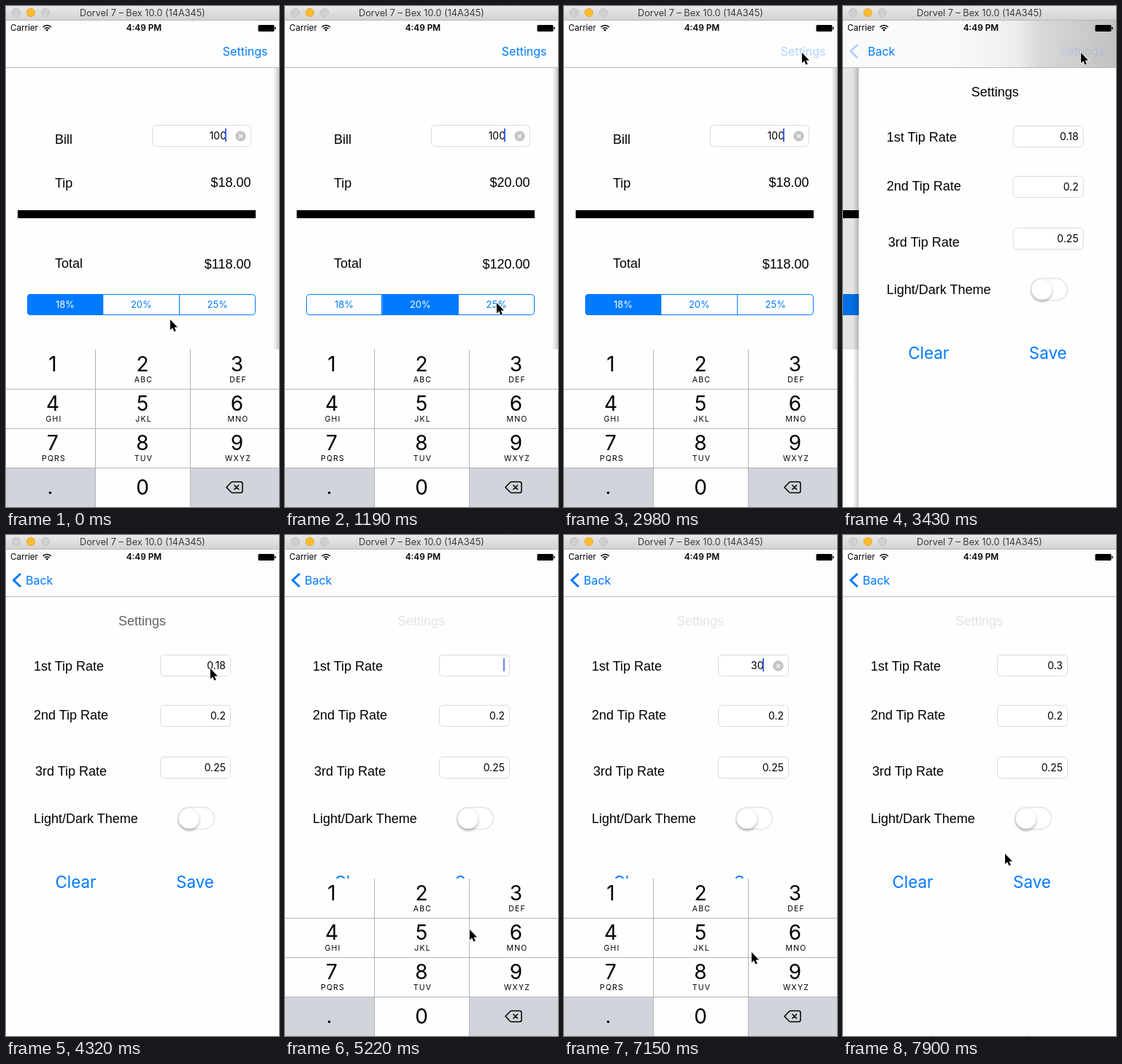
Write an HTML page that moves like this. It is 374 px wide and 687 px high and loops after 8000 ms.

```html
<!DOCTYPE html>
<html lang="en">
<head>
<meta charset="utf-8">
<title>Tip calculator</title>
<style>
html, body { margin: 0; width: 100%; height: 100%; overflow: hidden; background: #fefefe; }
svg { display: block; width: 374px; height: 687px; }
text { font-family: Inter, Roboto, sans-serif; white-space: pre; }
.label { font-family: "Liberation Sans", Arial, sans-serif; font-size: 18px; }
.nav { font-size: 16px; fill: #007aff; }
.value { font-size: 14px; text-anchor: end; }
.big { font-size: 22.4px; fill: #007aff; text-anchor: middle; }
.seg { font-size: 13px; text-anchor: middle; }
.digit { font-size: 28px; text-anchor: middle; }
.abc { font-size: 10.5px; letter-spacing: 1.2px; text-anchor: middle; }
</style>
</head>
<body>
<svg id="stage" viewBox="0 0 374 687">
  <defs>
    <linearGradient id="chrome" x2="0" y2="1">
      <stop stop-color="#e9e9e9"/><stop offset="1" stop-color="#d1d1d1"/>
    </linearGradient>
    <linearGradient id="edge">
      <stop stop-opacity="0"/><stop offset="1" stop-opacity=".22"/>
    </linearGradient>
    <linearGradient id="haze">
      <stop offset=".4" stop-color="#fafafa"/><stop offset=".63" stop-color="#eee"/>
      <stop offset=".72" stop-color="#d8d8d8"/><stop offset="1" stop-color="#c2c2c2"/>
    </linearGradient>
    <filter id="soft" x="-50%" y="-50%" width="200%" height="200%">
      <feDropShadow dx="0" dy="2.5" stdDeviation="1.6" flood-opacity=".28"/>
    </filter>
    <clipPath id="pill"><rect x="29" y="395" width="313" height="29" rx="4.5"/></clipPath>
  </defs>
</svg>
<script>
const LOOP = 8000, TICK = 149.06;
const BLUE = '#007aff';
const stage = document.getElementById('stage');

function add(parent, tag, attrs = {}, content) {
  const node = document.createElementNS('http://www.w3.org/2000/svg', tag);
  set(node, attrs);
  if (content !== undefined) node.textContent = content;
  parent.appendChild(node);
  return node;
}
function set(node, attrs) {
  for (const name in attrs) node.setAttribute(name, attrs[name]);
}
const group = parent => add(parent, 'g');
const rect = (p, x, y, width, height, fill, more) => add(p, 'rect', { x, y, width, height, fill, ...more });
const text = (p, cls, x, y, content, more) => add(p, 'text', { class: cls, x, y, ...more }, content);
const line = (p, d, stroke, width, more) =>
  add(p, 'path', { d, stroke, 'stroke-width': width, fill: 'none', ...more });
const show = (node, on) => set(node, { opacity: +on });
const move = (node, x, y) => set(node, { transform: `translate(${x} ${y})` });

function field(p, x, y, width) {
  rect(p, x + .5, y + .5, width - 1, 29, '#fff', { rx: 5, stroke: '#dadada' });
}
function clearButton(p, x, y) {
  const g = group(p);
  add(g, 'circle', { cx: x, cy: y, r: 7.2, fill: '#c4c4c8' });
  line(g, `M${x - 2.6} ${y - 2.6}l5.2 5.2m0 -5.2l-5.2 5.2`, '#fff', 1.3);
  return g;
}

// Bill page
const bill = group(stage);
rect(bill, 0, 85, 374, 602, '#fefefe');
text(bill, 'label', 67, 188.5, 'Bill');
text(bill, 'label', 67, 248.5, 'Tip');
text(bill, 'label', 67, 358.5, 'Total');
field(bill, 200, 163, 136);
text(bill, 'value', 302, 182.5, '100');
clearButton(bill, 321.5, 178.5);
const billCaret = rect(bill, 300, 168, 2, 18, '#4362ee');
const tip = text(bill, 'label', 335.5, 248, '', { 'text-anchor': 'end' });
const total = text(bill, 'label', 335.5, 359.5, '', { 'text-anchor': 'end' });
rect(bill, 16, 280, 326, 11, '#000');
const segBox = add(bill, 'g', { 'clip-path': 'url(#pill)' });
const segments = ['18%', '20%', '25%'].map((name, i) => ({
  fill: rect(segBox, 29 + i * 104.3, 395, 104.3, 29, BLUE),
  name: text(bill, 'seg', 81 + i * 104.4, 414, name)
}));
line(bill, 'M132.5 396V423M237.5 396V423', BLUE, 1);
rect(bill, 29.5, 395.5, 312, 28, 'none', { rx: 4, stroke: BLUE });
const dim = rect(stage, 0, 85, 374, 386, '#000', { 'fill-opacity': .1 });

// Settings page
const prefs = group(stage);
rect(prefs, -8, 20, 8, 667, 'url(#edge)');
rect(prefs, 0, 20, 374, 667, '#fefefe');
const heading = text(prefs, 'label', 154, 124, 'Settings');
text(prefs, 'label', 38, 186, '1st Tip Rate');
text(prefs, 'label', 38, 253, '2nd Tip Rate');
text(prefs, 'label', 40, 330, '3rd Tip Rate');
text(prefs, 'label', 38, 395, 'Light/Dark Theme');
[164, 233, 304].forEach(y => field(prefs, 211, y, 97));
const rate = text(prefs, 'value', 301, 183.5, '');
text(prefs, 'value', 301, 252.5, '0.2');
text(prefs, 'value', 301, 323.5, '0.25');
const rateClear = clearButton(prefs, 293.5, 179.5);
const rateCaret = rect(prefs, 299, 169, 2, 18, '#4362ee');
rect(prefs, 235.5, 373.5, 50, 30, '#fff', { rx: 15, stroke: '#e2e2e2', 'stroke-width': 1.4 });
add(prefs, 'circle', { cx: 250.7, cy: 388.7, r: 14.2, fill: '#fff', stroke: '#ddd', 'stroke-width': .6, filter: 'url(#soft)' });
text(prefs, 'big', 95.5, 483.5, 'Clear');
text(prefs, 'big', 259, 483.5, 'Save');

// Keypad
const pad = group(stage);
rect(pad, 0, 471, 374, 216, '#fefefe');
rect(pad, 0, 633, 122, 54, '#d1d4db');
rect(pad, 253, 633, 121, 54, '#d1d4db');
const key3 = rect(pad, 253, 471, 121, 54, '#d1d4db');
const key0 = rect(pad, 123, 633, 129, 54, '#d1d4db');
line(pad, 'M122.5 471V687M252.5 471V687M0 525.5H374M0 579.5H374M0 633.5H374', '#b4b4b6', 1);
const colX = [64, 187, 316.5];
['', 'ABC', 'DEF', 'GHI', 'JKL', 'MNO', 'PQRS', 'TUV', 'WXYZ'].forEach((letters, i) => {
  const x = colX[i % 3], y = 501 + 54 * Math.floor(i / 3);
  text(pad, 'digit', x, y, i + 1);
  text(pad, 'abc', x + 1.5, y + 15, letters);
});
text(pad, 'digit', 187, 670, '0');
add(pad, 'circle', { cx: 60.5, cy: 667.5, r: 1.8 });
line(pad, 'M302 660L308.5 653.2Q309.3 652.5 310.3 652.5H321.5Q324 652.5 324 655V665Q324 667.5 321.5 667.5H310.3Q309.3 667.5 308.5 666.8Z' +
  'M312.5 656.7l6.6 6.6m0 -6.6l-6.6 6.6', '#000', 1.5, { 'stroke-linejoin': 'round' });

// Navigation bar
rect(stage, 0, 20, 374, 64, '#fdfdfd');
const haze = rect(stage, 0, 20, 374, 64, 'url(#haze)');
rect(stage, 0, 84, 374, 1, '#b9b9b9');
const link = text(stage, 'nav', 358.5, 68, 'Settings', { 'text-anchor': 'end' });
const chevron = line(stage, 'M20 53L10.5 62L20 71', BLUE, 3);
const back = text(stage, 'nav', 27, 68, 'Back');

// Status bar
text(stage, '', 6, 34, 'Carrier', { 'font-size': 11.6 });
line(stage, 'M50.6 29a7.6 7.6 0 0 1 11.2 0M52.8 31.2a4.8 4.8 0 0 1 6.8 0', '#000', 1.5);
add(stage, 'path', { d: 'M54.3 32.6a2.8 2.8 0 0 1 3.8 0L56.2 34.7Z' });
text(stage, '', 189, 34, '4:49 PM', { 'font-size': 11.8, 'font-weight': 600, 'text-anchor': 'middle' });
rect(stage, 345.5, 26, 22, 9, '#000', { rx: 1.5 });
rect(stage, 368.2, 28.7, 1.5, 3.6, '#000', { rx: .7 });

// Window bar
rect(stage, 0, 0, 374, 20, 'url(#chrome)');
rect(stage, 0, 19, 374, 1, '#b8b8b8');
[['#d0d0d0', '#bcbcbc'], ['#fdbc2e', '#dfa023'], ['#d0d0d0', '#bcbcbc']].forEach(([fill, stroke], i) =>
  add(stage, 'circle', { cx: 14 + i * 20, cy: 9, r: 5.6, fill, stroke, 'stroke-width': .8 }));
text(stage, '', 187, 14, 'Dorvel 7 – Bex 10.0 (14A345)', { 'font-size': 12.7, fill: '#3c3c3c', 'text-anchor': 'middle' });

const cursor = add(stage, 'path', {
  d: 'M0 0V14.2L3.2 11.2L5.4 16.4L7.8 15.4L5.6 10.4H10Z',
  stroke: '#fff', 'stroke-width': 1.3, 'paint-order': 'stroke'
});

// Key lists are [tick, value, ...]; values between keys are interpolated.
const path = [
  [0, 225, 430], [3, 185, 409], [5, 185, 409], [8, 290, 407], [10, 290, 407], [14, 81, 405],
  [16, 81, 405], [20, 326, 64], [23, 326, 64], [28, 280, 183], [30, 280, 183], [32, 293, 181],
  [33, 293, 181], [35, 253, 541], [38, 312, 497], [40, 312, 497], [44, 183, 664], [47, 183, 664],
  [49, 331, 480], [50, 222, 437]
];
const levels = [
  [[3, 1], [4, 0], [14, 0], [15, .3], [16, 1]],
  [[3, 0], [4, 1], [9, 1], [10, 0]],
  [[9, 0], [10, 1], [14, 1], [15, .82], [16, 0]]
];
const padDrop = [[22, 0], [23, 216], [30, 216], [31, 150], [32, 20], [33, 0], [51, 0], [52, 110], [53, 215]];
const slide = [[22, 374], [23, 21.7], [24, 3], [25, 0]];
const smooth = p => p * p * (3 - 2 * p);
const clamp = v => Math.max(0, Math.min(1, v));

function tween(keys, k, ease = p => p) {
  const i = keys.findIndex(key => key[0] > k);
  if (i === 0) return keys[0].slice(1);
  if (i < 0) return keys[keys.length - 1].slice(1);
  const a = keys[i - 1], b = keys[i], p = ease((k - a[0]) / (b[0] - a[0]));
  return a.slice(1).map((v, j) => v + (b[j + 1] - v) * p);
}
const within = (k, from, to) => k >= from && k < to;

function draw(k) {
  const onPrefs = k >= 23;
  const blink = clamp(.5 + 1.4 * Math.cos(k * TICK / 1000 * 2 * Math.PI));

  const amount = within(k, 4, 10) ? 20 : within(k, 10, 15) ? 25 : 18;
  tip.textContent = `$${amount}.00`;
  total.textContent = `$${100 + amount}.00`;
  segments.forEach((s, i) => {
    const [v] = tween(levels[i], k);
    set(s.fill, { 'fill-opacity': v });
    set(s.name, { fill: `rgb(${255 * v},${122 + 133 * v},255)` });
  });
  show(billCaret, 0);
  set(billCaret, { opacity: blink });
  move(bill, onPrefs ? -105 : 0, 0);
  show(dim, onPrefs);

  const [x] = tween(slide, k);
  move(prefs, x, 0);
  set(heading, { opacity: 1 - .9 * smooth(clamp((k - 24.5) / 10)) });
  const editing = within(k, 31, 52);
  const value = k < 33 ? '0.18' : k < 40 ? '' : k < 46 ? '3' : k < 52 ? '30' : '0.3';
  const hasClear = editing && value !== '';
  rate.textContent = value;
  set(rate, { x: hasClear ? 273.5 : 301 });
  show(rateClear, hasClear);
  set(rateCaret, { x: hasClear ? 272 : 299, opacity: editing ? blink : 0 });

  move(pad, 0, tween(padDrop, k)[0]);
  show(key3, within(k, 39, 41));
  show(key0, within(k, 45, 47));

  const arriving = onPrefs ? clamp(x / 21.7) : 0;
  show(haze, 0);
  set(haze, { opacity: arriving });
  set(link, { opacity: onPrefs ? .12 * arriving : k >= 20 ? .3 : 1 });
  set(chevron, { opacity: onPrefs ? 1 - .7 * arriving : 0 });
  set(back, { x: 27 + 7 * arriving, opacity: +onPrefs });

  move(cursor, ...tween(path, k, smooth));
}

function loop(now) {
  draw(Math.floor((now % LOOP + 5) / TICK));
  requestAnimationFrame(loop);
}
draw(0);
requestAnimationFrame(loop);
</script>
</body>
</html>
```
